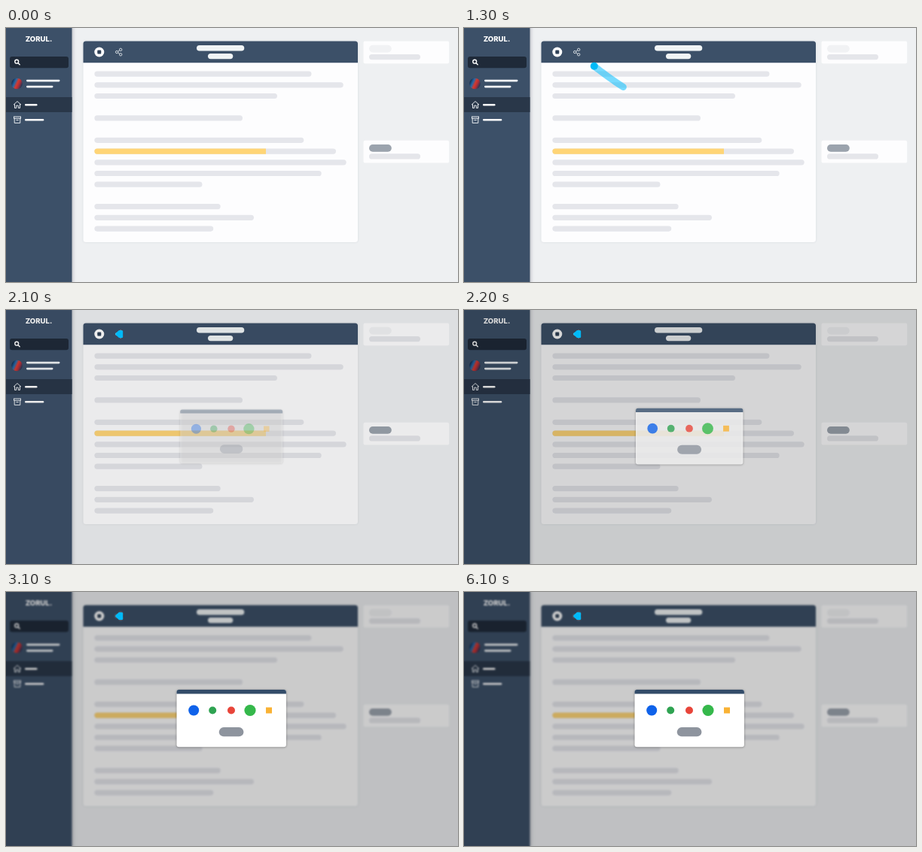
Recreate the animation shown at these times as an HTML page with a canvas. Size 600x338 px, loop 7 s.

```html
<!DOCTYPE html>
<html lang="en">
<head>
<meta charset="utf-8">
<title>Share dialog</title>
<style>
html, body { margin: 0; width: 100%; height: 100%; overflow: hidden; background: #eef0f2; }
canvas { display: block; width: 600px; height: 338px; }
</style>
</head>
<body>
<canvas id="stage"></canvas>
<script>
const W = 600, H = 338, LOOP = 7000, STEP = 100;
const NAVY = '#3c5068', CYAN = '#00baf8';
const dpr = window.devicePixelRatio || 1;

const stage = document.getElementById('stage');
const page = document.createElement('canvas');
const ctx = setup(stage);
const pageCtx = setup(page);

function setup(canvas) {
  canvas.width = W * dpr;
  canvas.height = H * dpr;
  const c = canvas.getContext('2d');
  c.scale(dpr, dpr);
  return c;
}

function box(c, x0, y0, x1, y1, r, fill) {
  c.fillStyle = fill;
  c.beginPath();
  c.roundRect(x0, y0, x1 - x0, y1 - y0, r);
  c.fill();
}

function bar(c, x0, x1, y, h, fill) {
  box(c, x0, y - h / 2, x1, y + h / 2, h / 2, fill);
}

function disc(c, x, y, r, fill) {
  c.fillStyle = fill;
  c.beginPath();
  c.arc(x, y, r, 0, Math.PI * 2);
  c.fill();
}

function ring(c, x, y, r) {
  c.beginPath();
  c.arc(x, y, r, 0, Math.PI * 2);
  c.stroke();
}

function line(c, ...pts) {
  c.beginPath();
  for (let i = 0; i < pts.length; i += 2) c.lineTo(pts[i], pts[i + 1]);
  c.stroke();
}

function shadow(c, color, blur, dy) {
  c.shadowColor = color;
  c.shadowBlur = blur * dpr;
  c.shadowOffsetY = dy * dpr;
}

function drawSidebar(c) {
  c.save();
  shadow(c, 'rgba(40,50,65,.35)', 5, 0);
  box(c, 0, -10, 87.5, H + 10, 0, NAVY);
  c.restore();

  c.fillStyle = '#fff';
  c.font = '800 9.6px Inter, sans-serif';
  c.textAlign = 'center';
  c.fillText('ZORUL.', 43.5, 17.6);

  box(c, 5, 38, 83, 53.3, 3, '#1f2a39');
  c.strokeStyle = '#fff';
  c.lineWidth = 1.4;
  c.lineCap = 'round';
  ring(c, 14.2, 44.7, 2.4);
  line(c, 16.2, 46.7, 18.2, 48.7);

  const tone = c.createLinearGradient(8, 71, 21, 77);
  tone.addColorStop(0, '#142c4c');
  tone.addColorStop(0.28, '#246aa8');
  tone.addColorStop(0.52, '#d8382c');
  tone.addColorStop(0.72, '#a8303c');
  tone.addColorStop(1, '#1d3558');
  disc(c, 14.5, 74, 7.3, tone);
  bar(c, 27, 71.5, 70.1, 2.6, '#f1f4f6');
  bar(c, 27, 62.5, 78.1, 2.6, '#f1f4f6');

  box(c, 0, 92, 87.5, 112, 0, '#293749');
  bar(c, 25, 41.5, 102.3, 2.6, '#fff');
  bar(c, 25, 50.3, 122.3, 2.6, '#fff');

  c.strokeStyle = '#e6eaee';
  c.lineWidth = 1;
  line(c, 10.2, 102, 15, 97.6, 19.8, 102);
  line(c, 11.5, 101.5, 11.5, 106.5, 13.7, 106.5, 13.7, 103.2, 16.3, 103.2,
    16.3, 106.5, 18.5, 106.5, 18.5, 101.5);
  c.strokeRect(10.5, 118, 9, 2.3);
  line(c, 11.2, 120.4, 11.2, 126.4, 18.8, 126.4, 18.8, 120.4);
  line(c, 13.7, 122.6, 16.3, 122.6);
}

function drawPanel(c) {
  c.save();
  shadow(c, 'rgba(60,70,90,.12)', 3, 0);
  box(c, 102.5, 17.5, 467, 285, 3.5, '#fdfdfe');
  c.restore();
  box(c, 102.5, 17.5, 467, 46.3, [3.5, 3.5, 0, 0], NAVY);
  bar(c, 253, 316.3, 26.8, 7.6, '#f0f4f5');
  bar(c, 268, 301.3, 37.6, 7.4, '#f0f4f5');

  disc(c, 123.8, 32, 6.5, '#fff');
  box(c, 121.3, 29.5, 126.3, 34.5, 1, '#2f4157');

  c.strokeStyle = '#e3e8ed';
  c.lineWidth = 0.9;
  ring(c, 147.2, 32, 1.7);
  ring(c, 152.2, 28.8, 1.7);
  ring(c, 152.2, 35.3, 1.7);
  line(c, 148.8, 31.1, 150.7, 29.8);
  line(c, 148.8, 32.9, 150.7, 34.3);

  // right ends of the text rows; 0 leaves a blank row
  const ends = [405.5, 447.8, 360, 0, 314, 0, 395.3, 438, 451.7, 418.7, 260.5, 0, 284.7, 329, 275.3];
  ends.forEach((end, i) => {
    if (end) bar(c, 117.4, end, 61.1 + i * 14.71, 7.2, '#e5e6eb');
  });
  box(c, 117.4, 160.5, 345, 167.7, [3.6, 0, 0, 3.6], '#ffd576');
}

function drawCard(c, y, pill) {
  box(c, 474.5, y, 588.2, y + 29.8, 2, '#fdfdfe');
  bar(c, 482, 511.8, y + 10.2, 9.6, pill);
  bar(c, 482, 550, y + 21.2, 7.2, '#e5e6ea');
}

function drawPage(c) {
  c.fillStyle = '#eef0f2';
  c.fillRect(0, 0, W, H);
  drawPanel(c);
  drawCard(c, 17.4, '#f1f2f4');
  drawCard(c, 149.7, '#9ba3ad');
  drawSidebar(c);
}

function drawDialog(c, p) {
  const cx = 299.2, cy = 168, scale = 0.9 + 0.1 * p;
  c.save();
  c.globalAlpha = p;
  c.translate(cx, cy);
  c.scale(scale, scale);
  c.translate(-cx, -cy);
  c.save();
  shadow(c, 'rgba(0,0,0,.4)', 3, 0.5);
  box(c, 226.5, 130, 371.9, 206.2, 3, '#fff');
  c.restore();
  box(c, 226.5, 130, 371.9, 135.4, [3, 3, 0, 0], '#334c69');
  disc(c, 249.2, 157.5, 7, '#0f62ea');
  disc(c, 274.2, 157.5, 5, '#2fa352');
  disc(c, 299, 157.5, 5, '#e8453a');
  disc(c, 324, 157.5, 7.6, '#35b84b');
  box(c, 345, 153.5, 353, 161.5, 0, '#f9b234');
  bar(c, 282.8, 315.4, 186.2, 12.2, '#8e949e');
  c.restore();
}

// Pointer path: a quadratic curve from the right edge to the share button
function pointerAt(t) {
  const u = Math.min(1, Math.max(0, (t - 580) / 820));
  const s = Math.pow(1 - u, 1.3), q = 1 - s;
  return [
    q * q * 150.3 + 2 * q * s * 320 + s * s * 605,
    q * q * 32 + 2 * q * s * 182 + s * s * 178
  ];
}

function drawPointer(c, t) {
  if (t < 600) return;
  if (t >= 2100) {
    c.fillStyle = c.strokeStyle = CYAN;
    c.lineWidth = 2.4;
    c.lineJoin = 'round';
    c.beginPath();
    [146.4, 32, 150.5, 28.2, 154, 28.4, 154, 35.8, 150.5, 35.8].forEach((v, i, a) => {
      if (i % 2) c.lineTo(a[i - 1], v);
    });
    c.closePath();
    c.fill();
    c.stroke();
    return;
  }
  if (t < 1500) {
    c.strokeStyle = 'rgba(0,190,255,.53)';
    c.lineWidth = 9;
    c.lineCap = c.lineJoin = 'round';
    c.beginPath();
    for (let i = 0; i <= 16; i++) c.lineTo(...pointerAt(t - 110 * i / 16));
    c.stroke();
  }
  const press = t > 1500 && t < 1900 ? Math.sin(Math.PI * (t - 1500) / 400) : 0;
  disc(c, ...pointerAt(t), 5 - 0.8 * press, CYAN);
}

function openness(t) {
  const u = Math.min(1, Math.max(0, (t - 1970) / 325));
  return u * u * (3 - 2 * u);
}

function draw(t) {
  const p = openness(t);
  ctx.drawImage(page, 0, 0, W, H);
  if (p > 0) {
    ctx.filter = `blur(${0.9 * p * dpr}px)`;
    ctx.drawImage(page, 0, 0, W, H);
    ctx.filter = 'none';
    ctx.fillStyle = `rgba(0,0,4,${0.2 * p})`;
    ctx.fillRect(0, 0, W, H);
    drawDialog(ctx, p);
  }
  drawPointer(ctx, t);
}

drawPage(pageCtx);
const start = performance.now();

function tick() {
  const t = (performance.now() - start) % LOOP;
  draw(Math.floor((t + 5) / STEP) * STEP % LOOP);
  requestAnimationFrame(tick);
}
tick();
</script>
</body>
</html>
```
